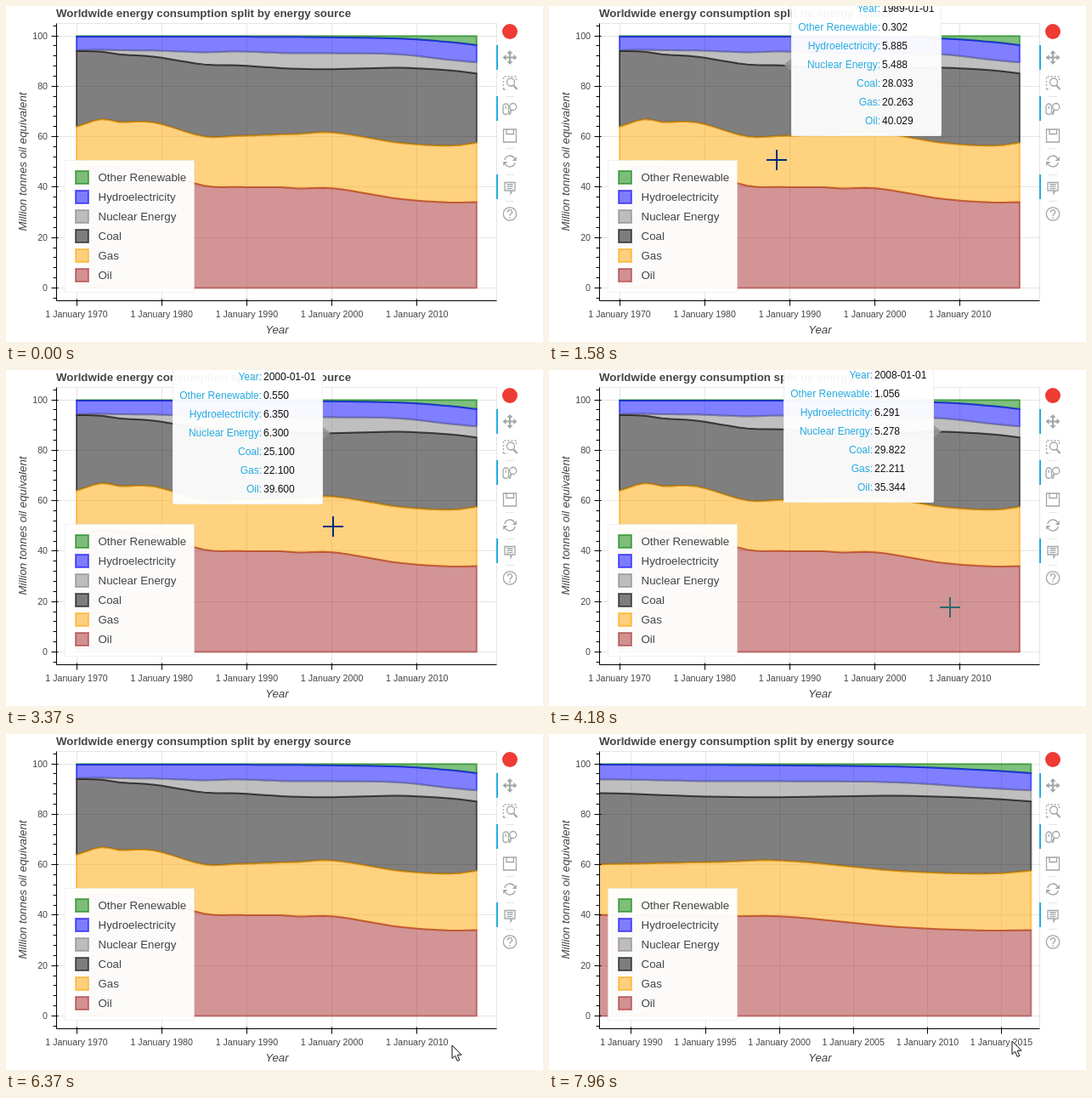
An HTML page that plays this animation: 632 px wide and 395 px high, repeating every 8000 ms.

```html
<!DOCTYPE html>
<html lang="en">
<head>
<meta charset="utf-8">
<title>Energy chart</title>
<style>
html, body { margin: 0; width: 100%; height: 100%; overflow: hidden; background: #fff; }
svg { display: block; width: 632px; height: 395px; font-family: "Liberation Sans", Arial, sans-serif; }
.tick { font-size: 10.67px; fill: #444; }
.label { font-size: 13.33px; fill: #444; }
.tip { font-size: 12px; }
.icon { fill: none; stroke: #a1a6a9; stroke-width: 1.3; }
.solid { fill: #a1a6a9; stroke: none; }
.cross { stroke: #fff; stroke-width: 2; mix-blend-mode: difference; }
</style>
</head>
<body>
<svg id="stage" viewBox="0 0 632 395"></svg>
<script>
const LOOP = 8000, TICK = 199;
const LEFT = 59.5, RIGHT = 577.5, TOP = 20.5, BOTTOM = 346.5;
const FIRST = 1970, LAST = 2017;
const BLUE = '#26aae1';

// Bottom to top of the stack
const sources = [
  ['Oil', '#a52a2a'], ['Gas', '#ffa500'], ['Coal', '#000'],
  ['Nuclear Energy', '#808080'], ['Hydroelectricity', '#00f'], ['Other Renewable', '#008000']
];

// Key years with the cumulative share up to each source; a smooth curve joins them
const keys = [
  [1970, 46, 64, 94, 94.3, 99.75],
  [1973, 48.5, 67, 93.7, 94.5, 99.75],
  [1975, 47.5, 65.8, 92.7, 94.3, 99.75],
  [1979, 46.5, 65.7, 91.8, 94.2, 99.73],
  [1985, 40.6, 60.1, 88.7, 93.5, 99.72],
  [1989, 40.029, 60.292, 88.325, 93.813, 99.698],
  [1994, 39.9762, 60.8804, 87.2396, 93.2408, 99.602],
  [1996, 39.48, 61.076, 86.937, 93.114, 99.591],
  [2000, 39.6, 61.7, 86.8, 93.1, 99.45],
  [2008, 35.3436, 57.5542, 87.3758, 92.6534, 98.944],
  [2014, 33.9, 56.4, 86.3, 90.4, 97.5],
  [2017, 34.1, 57.6, 85.1, 89.5, 96.3]
];

// Pointer: first place, then moves as start tick, end tick, x, y
const origin = { x: 370, y: 290 };
const moves = [
  [1, 3, 332, 189], [4, 5, 318, 189], [5, 8, 268, 181],
  [12, 15, 347, 185], [15, 18, 404, 184], [20, 21, 472, 279],
  [21, 25, 525, 366], [32, 33, 530, 362], [34, 35, 536, 361], [38, 40, 545, 361]
];
const HOVER_LAG = 0.1;

const clamp = (v, lo, hi) => Math.min(hi, Math.max(lo, v));
const pointerAt = n => moves.reduce((p, [from, to, x, y]) => {
  const f = clamp((n - from) / (to - from), 0, 1);
  return { x: p.x + (x - p.x) * f, y: p.y + (y - p.y) * f };
}, origin);

const yOf = v => 331.5 - 2.9636 * v;
const xOf = (year, zoom) => {
  const pivot = 535.8;
  return pivot + (83 + 10.02 * (year - FIRST) - pivot) * Math.pow(1.739, zoom / 3);
};
const px = v => Math.floor(v) + 0.5;
const line = (x1, y1, x2, y2, color) =>
  `<path d="M${x1} ${y1}L${x2} ${y2}" stroke="${color}"/>`;
const text = (x, y, s, cls, extra = '') =>
  `<text x="${x}" y="${y}" class="${cls}" ${extra}>${s}</text>`;
const paint = color =>
  `fill="${color}" fill-opacity=".5" stroke="${color}" stroke-opacity=".55" stroke-width="2"`;
const END = 'text-anchor="end"', MIDDLE = 'text-anchor="middle"';

// Cubic through the key years
function share(k, year) {
  if (k === 0) return 0;
  if (k === sources.length) return 100;
  const i = Math.max(1, keys.findIndex(r => r[0] >= year));
  const slope = j => {
    const a = keys[Math.max(0, j - 1)], b = keys[Math.min(keys.length - 1, j + 1)];
    return (b[k] - a[k]) / (b[0] - a[0]);
  };
  const a = keys[i - 1], b = keys[i], span = b[0] - a[0];
  const f = (year - a[0]) / span, g = 1 - f;
  return a[k] * g * g * (1 + 2 * f) + b[k] * f * f * (1 + 2 * g) +
    span * f * g * (slope(i - 1) * g - slope(i) * f);
}

function areas(zoom) {
  const edge = k => Array.from({ length: LAST - FIRST + 1 }, (_, i) =>
    xOf(FIRST + i, zoom).toFixed(2) + ' ' + yOf(share(k, FIRST + i)).toFixed(2));
  return sources.map(([, color], k) =>
    `<path d="M${edge(k + 1).join('L')}L${edge(k).reverse().join('L')}Z" ${paint(color)} stroke-linejoin="round"/>`
  ).reverse().join('');
}

function plot(zoom) {
  const gap = zoom < 2 ? 10 : 5;
  let grid = '', axes = '';
  for (let year = FIRST; year <= LAST; year += gap) {
    const x = xOf(year, zoom);
    if (x < LEFT) continue;
    grid += line(px(x), TOP, px(x), BOTTOM, '#e5e5e5');
    axes += line(px(x), BOTTOM - 2, px(x), BOTTOM + 6, '#000') +
      text(x.toFixed(1), 366, '1 January ' + year, 'tick', MIDDLE);
  }
  for (let v = -4; v <= 104; v += 4) {
    const y = px(yOf(v)), major = v % 20 === 0;
    axes += line(major ? LEFT - 6 : LEFT - 4, y, major ? LEFT + 2 : LEFT, y, '#000');
    if (!major) continue;
    grid += line(LEFT, y, RIGHT, y, '#e5e5e5');
    axes += text(49, y + 3.5, v, 'tick', END);
  }
  axes += line(LEFT, TOP, LEFT, BOTTOM, '#000') + line(LEFT, BOTTOM, RIGHT, BOTTOM, '#000');
  return `<rect x="${LEFT}" y="${TOP}" width="${RIGHT - LEFT}" height="${BOTTOM - TOP}" fill="none" stroke="#e5e5e5"/>
    ${grid}<g clip-path="url(#frame)">${areas(zoom)}</g>${axes}`;
}

function legend() {
  const rows = sources.map(([name, color], k) => {
    const y = 316 - 23 * k;
    return `<rect x="82" y="${y - 7}" width="15" height="15" ${paint(color)}/>` +
      text(108.5, y + 5, name, 'label');
  });
  return `<rect x="69.5" y="181.5" width="152" height="155" fill="#fff" fill-opacity=".95"
    stroke="#e5e5e5" stroke-opacity=".5"/>` + rows.join('');
}

function toolbar() {
  const at = (y, shape) => `<g class="icon" transform="translate(593 ${y})">${shape}</g>`;
  const bars = [46, 106, 198].map(y => `<rect x="577" y="${y}" width="2" height="29" fill="${BLUE}"/>`);
  const dividers = [106.5, 167.5, 198.5, 229.5].map(y => line(588, y, 598, y, '#e5e5e5'));
  return '<circle cx="593" cy="30" r="9" fill="#ee3b33"/>' + bars.join('') + dividers.join('') +
    at(60.5, '<path d="M-6 0H6M0 -6V6" stroke-width="2"/><path class="solid" d="M0 -8.5L3.5 -4.5H-3.5ZM0 8.5L3.5 4.5H-3.5ZM-8.5 0L-4.5 -3.5V3.5ZM8.5 0L4.5 -3.5V3.5Z"/>') +
    at(90.5, '<path d="M-7.5 7.5V-7.5H7.5V-2M-7.5 7.5H-3" stroke-dasharray="2 2"/><circle cx="1" cy="-1" r="4.5"/><path d="M4 2.5L8.5 7.5" stroke-width="2.2"/>') +
    at(121, '<rect x="-8" y="-6" width="6.5" height="12.5" rx="3.2"/><path d="M-4.8 -3.5V0"/><circle cx="3.8" cy="-2.5" r="4"/><path d="M1.5 1L-.5 7" stroke-width="2"/>') +
    at(152.5, '<path d="M-7.5 -7.5H7.5V7.5H-7.5ZM-4 -7.5V-2H4.5V-7.5"/>') +
    at(182.5, '<path d="M-6.2 -1.5A6.3 6.3 0 0 1 5.3 -3.5M6.2 1.5A6.3 6.3 0 0 1 -5.3 3.5"/><path class="solid" d="M7.8 -5.5V-.5H2.8ZM-7.8 5.5V.5H-2.8Z"/>') +
    at(213.5, '<path d="M-6 -6H6V3.5H3L1 7V3.5H-6ZM-3.5 -3.5H3.5M-3.5 -1.2H3.5M-3.5 1.1H3.5"/>') +
    at(244.5, '<circle r="7.7"/><path d="M-2.6 -1.8A2.6 2.6 0 1 1 1 .2Q0 .8 0 2.2M0 3.6V5.2"/>');
}

function tooltip(year) {
  const x = xOf(year, 0), y = Math.round(yOf(share(3, year)) - 0.7);
  const onLeft = x > (LEFT + RIGHT) / 2;
  const box = Math.round(onLeft ? x - 187.5 : x + 11.5);
  const base = onLeft ? box + 177 : box, tip = base + (onLeft ? 9 : -9);
  const rows = sources.map(([name], k) => [name, (share(k + 1, year) - share(k, year)).toFixed(3)]);
  rows.push(['Year', year + '-01-01']);
  return `<path d="M${base} ${y - 7}L${tip} ${y}L${base} ${y + 7}Z" fill="#909599" fill-opacity=".9"/>
    <rect x="${box}" y="${y - 83}" width="177" height="167" rx="2" fill="#fff" fill-opacity=".95"/>
    <rect x="${box + .5}" y="${y - 82.5}" width="176" height="166" rx="2" fill="none" stroke="#ddd" stroke-opacity=".5"/>` +
    rows.reverse().map(([name, value], i) => {
      const row = y - 62 + 22 * i;
      return text(box + 105, row, name + ':', 'tip', END + ` fill="${BLUE}"`) +
        text(box + 107, row, value, 'tip', 'fill="#111"');
    }).join('');
}

const cross = (x, y) =>
  `<path class="cross" d="M${x - 12} ${y}H${x + 12}M${x} ${y - 12}V${y + 12}"/>`;
const arrow = (x, y) =>
  `<path transform="translate(${x} ${y})" d="M0 0V15.5L3.6 12.2L6.2 18.4L8.8 17.3L6.2 11.2H11Z" fill="#fff" stroke="#111"/>`;

function pointer(n) {
  if (n < 1) return '';
  const p = pointerAt(n), x = Math.round(p.x), y = Math.round(p.y);
  if (y > BOTTOM) return arrow(x, y);
  const year = FIRST + Math.round((pointerAt(n - HOVER_LAG).x - 83) / 10.02);
  return tooltip(year) + cross(x, y);
}

const fixed = text(59, 13, 'Worldwide energy consumption split by energy source', 'label', 'font-weight="bold"') +
  text(0, 0, 'Million tonnes oil equivalent', 'label', MIDDLE + ' font-style="italic" transform="translate(24 183) rotate(-90)"') +
  text(319, 385, 'Year', 'label', MIDDLE + ' font-style="italic"') + toolbar();

const stage = document.getElementById('stage');
let shown = -1;

function draw(t) {
  const n = Math.floor((t + 15) / TICK);
  if (n === shown) return;
  shown = n;
  stage.innerHTML = `<clipPath id="frame"><rect x="${LEFT}" y="${TOP}" width="${RIGHT - LEFT}" height="${BOTTOM - TOP}"/></clipPath>
    <rect width="632" height="395" fill="#fff"/>` +
    plot(clamp(n - 35, 0, 3)) + legend() + fixed + pointer(n);
}

const start = performance.now();
function frame() {
  draw((performance.now() - start) % LOOP);
  requestAnimationFrame(frame);
}
frame();
</script>
</body>
</html>
```
